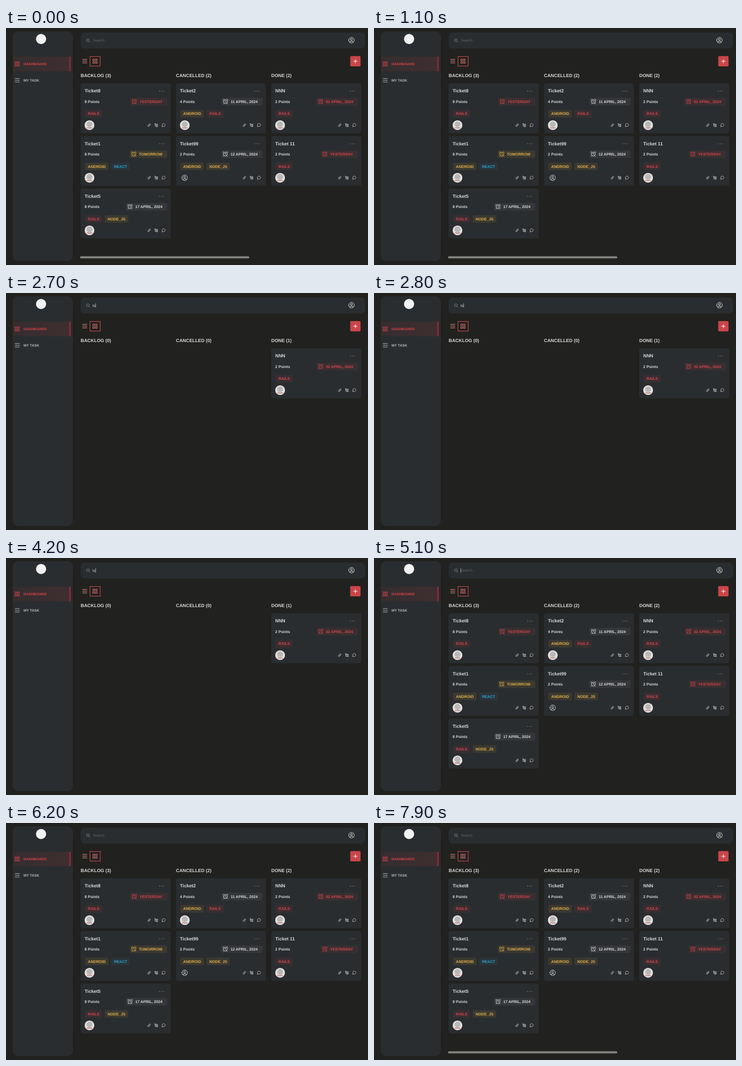
Recreate the animation shown at these times as an HTML page with a canvas. Size 640 by 420 pixels, loop 8 s.

```html
<!DOCTYPE html>
<html lang="en">
<head>
<meta charset="utf-8">
<title>Ticket board</title>
<style>
  html, body { margin: 0; width: 100%; height: 100%; overflow: hidden; background: #21221f; }
  canvas { display: block; width: 640px; height: 420px; }
</style>
</head>
<body>
<canvas id="stage"></canvas>
<script>
const LOOP = 8000;
const FONT = '"Liberation Sans", Arial, sans-serif';
const C = {
  bg: '#21221f', panel: '#2a2d2f', light: '#d6d7d7', dim: '#64676a',
  red: '#d4434a', yellow: '#e0b048', blue: '#2e9fd0', button: '#cb4549'
};
const TINT = {
  [C.red]: 'rgba(212,67,74,.09)', [C.yellow]: 'rgba(224,176,72,.09)',
  [C.blue]: 'rgba(46,159,208,.07)', [C.light]: 'rgba(148,151,154,.1)'
};
const TAG_COLOR = { RAILS: C.red, ANDROID: C.yellow, REACT: C.blue, NODE_JS: C.yellow };

const card = (title, points, due, color, tags, avatar = true) =>
  ({ title, points, due, color, tags, avatar });
const COLUMNS = [
  { name: 'BACKLOG', cards: [
    card('Ticket8', 8, 'YESTERDAY', C.red, ['RAILS']),
    card('Ticket1', 8, 'TOMORROW', C.yellow, ['ANDROID', 'REACT']),
    card('Ticket5', 8, '17 APRIL, 2024', C.light, ['RAILS', 'NODE_JS'])
  ] },
  { name: 'CANCELLED', cards: [
    card('Ticket2', 4, '11 APRIL, 2024', C.light, ['ANDROID', 'RAILS']),
    card('Ticket99', 2, '12 APRIL, 2024', C.light, ['ANDROID', 'NODE_JS'], false)
  ] },
  { name: 'DONE', cards: [
    card('NNN', 2, '02 APRIL, 2024', C.red, ['RAILS']),
    card('Ticket 11', 2, 'YESTERDAY', C.red, ['RAILS'])
  ] }
];

// Moments of the interaction, in ms
const FOCUS = 1900, TYPE = 2700, CLEAR = 4800, BLUR = 5800;
const BAR_OFF = 1400, BAR_ON = 6600;

const canvas = document.getElementById('stage');
const ctx = canvas.getContext('2d');
const ratio = window.devicePixelRatio || 1;
canvas.width = 640 * ratio;
canvas.height = 420 * ratio;
// Unhinted glyphs keep their true height at these small sizes
ctx.textRendering = 'geometricPrecision';

function setFont(size, weight = 'bold') {
  ctx.font = `${weight} ${size}px ${FONT}`;
}

function text(str, x, y, size, color, weight) {
  setFont(size, weight);
  ctx.fillStyle = color;
  ctx.fillText(str, x, y);
}

function box(x, y, w, h, r, fill) {
  ctx.beginPath();
  ctx.roundRect(x, y, w, h, r);
  ctx.fillStyle = fill;
  ctx.fill();
}

function disc(x, y, r, fill) {
  ctx.beginPath();
  ctx.arc(x, y, r, 0, Math.PI * 2);
  ctx.fillStyle = fill;
  ctx.fill();
}

// Strokes an SVG path centred on (x, y)
function icon(d, x, y, color, width = 0.9) {
  ctx.save();
  ctx.translate(x, y);
  ctx.strokeStyle = color;
  ctx.lineWidth = width;
  ctx.lineCap = ctx.lineJoin = 'round';
  ctx.stroke(new Path2D(d));
  ctx.restore();
}

const ring = (r, x = 0, y = 0) => `M${x - r} ${y}a${r} ${r} 0 1 1 ${2 * r} 0a${r} ${r} 0 1 1 ${-2 * r} 0`;
const ICON = {
  grid: 'M-3.7-3.7h2.7v2.7h-2.7zM1-3.7h2.7v2.7h-2.7zM-3.7 1h2.7v2.7h-2.7zM1 1h2.7v2.7h-2.7z',
  list: 'M-3.8-3.1h7.6M-3.8 0h7.6M-3.8 3.1h7.6',
  search: ring(2.4, -0.4, -0.4) + 'M1.4 1.4L3 3',
  user: ring(4.9) + ring(1.7, 0, -1.1) + 'M-2.9 3.6q0-2 2.9-2t2.9 2',
  clock: ring(3.5, 0, 0.4) + 'M0-1.6v2.2l1.5.7M-4.4-2.5l1.8-1.6M4.4-2.5l-1.8-1.6M-2.5 3.2l-1 1M2.5 3.2l1 1',
  clip: 'M2-.5L-.4 2a1.2 1.2 0 0 1-1.7-1.7L.6-2.3a.8.8 0 0 1 1.2 1.2L-.8 1.3',
  branch: 'M-2-2.6v4.4h2M-2-1h2M.5-1.8h2v1.6h-2zM.5 1h2v1.6h-2zM-2.8-2.6h1.6',
  bubble: 'M-2.3 2.7l.4-1.5a2.7 2.7 0 1 1 1.2 1.2z',
  plus: 'M-3 0h6M0-3v6'
};

function drawSidebar() {
  box(12, 6, 106, 407, 9, C.panel);
  disc(62, 19.5, 9, '#f2f2f2');
  const glow = ctx.createLinearGradient(12, 0, 114, 0);
  glow.addColorStop(0, 'rgba(190,50,55,.08)');
  glow.addColorStop(1, 'rgba(190,50,55,.14)');
  box(12, 51, 102, 25.5, 0, glow);
  box(112.4, 51, 1.6, 25.5, 0, '#c3262d');
  icon(ICON.grid, 20, 63.7, C.red);
  text('DASHBOARD', 31, 66, 6.3, C.red);
  icon(ICON.list, 20, 92.7, '#b5b6b6');
  text('MY TASK', 31, 95, 6.3, '#b5b6b6');
}

function drawHeader(query, caret) {
  box(132, 8, 503, 28.5, 8, C.panel);
  icon(ICON.search, 145.3, 22, '#8a8c8e', 0.8);
  if (query) text(query, 153, 24.5, 6.5, C.light, 'normal');
  else text('Search', 154, 24.3, 6.3, C.dim, 'normal');
  if (caret) box(query ? 158 : 153, 18.3, 0.7, 7.4, 0, '#c8c9ca');
  icon(ICON.user, 610.8, 21.6, '#dddddd');
}

function drawToolbar() {
  icon(ICON.list, 139.2, 58.8, '#d08a88', 1);
  ctx.strokeStyle = '#c4484c';
  ctx.lineWidth = 1;
  ctx.strokeRect(148.5, 50.5, 18, 17);
  icon(ICON.grid, 157.5, 58.8, '#dc7474');
  box(608.6, 49.8, 18.2, 18.2, 1.8, C.button);
  icon(ICON.plus, 617.7, 58.9, '#f3e4e4', 1.1);
}

function drawAvatar(x, y) {
  disc(x, y, 8.6, '#e2e1e0');
  disc(x, y - 1.6, 5.2, '#b9b8b7');
  box(x - 5, y + 4, 10, 1.8, 0.9, '#c58a88');
}

function drawCard(c, x, y) {
  box(x, y, 159, 88.5, 4, C.panel);
  text(c.title, x + 7, y + 16.4, 8.2, C.light);
  for (let i = 0; i < 3; i++) disc(x + 139.6 + i * 3.7, y + 13.9, 0.65, '#9a9c9e');

  text(`${c.points} Points`, x + 7, y + 34.6, 6.75, C.light);
  setFont(6.75);
  const dueX = x + 144.6 - ctx.measureText(c.due).width;
  box(dueX - 16.5, y + 25.8, x + 153 - dueX + 16.5, 13.4, 2, TINT[c.color]);
  icon(ICON.clock, dueX - 9.2, y + 32, c.color);
  text(c.due, dueX, y + 34.6, 6.75, c.color);

  let tagX = x + 12.8;
  for (const tag of c.tags) {
    setFont(6.75);
    const w = ctx.measureText(tag).width;
    box(tagX - 5, y + 47.3, w + 10, 13.4, 2, TINT[TAG_COLOR[tag]]);
    text(tag, tagX, y + 56.4, 6.75, TAG_COLOR[tag]);
    tagX += w + 14.6;
  }

  if (c.avatar) drawAvatar(x + 15.6, y + 74.2);
  else icon(ICON.user, x + 15.4, y + 74.2, '#cfd0d0');
  icon(ICON.clip, x + 121, y + 74.2, '#c4c5c6', 0.8);
  icon(ICON.branch, x + 133.6, y + 74.2, '#c4c5c6', 0.8);
  icon(ICON.bubble, x + 146.2, y + 74, '#c4c5c6', 0.8);
}

function drawBoard(query) {
  COLUMNS.forEach(({ name, cards }, col) => {
    const x = 132 + col * 168.5;
    const shown = cards.filter(c => c.title.startsWith(query));
    text(`${name} (${shown.length})`, x, 86.8, 8.2, C.light);
    shown.forEach((c, row) => drawCard(c, x, 98 + row * 93.2));
  });
}

function caretVisible(t) {
  if (t < FOCUS || t >= BLUR) return false;
  const start = t >= CLEAR ? CLEAR : t >= TYPE ? TYPE + 50 : FOCUS;
  return t < start || (t - start) % 1000 < 500;
}

function draw(t) {
  const query = t >= TYPE && t < CLEAR ? 'N' : '';
  ctx.setTransform(ratio, 0, 0, ratio, 0, 0);
  ctx.fillStyle = C.bg;
  ctx.fillRect(0, 0, 640, 420);
  drawSidebar();
  drawHeader(query, caretVisible(t));
  drawToolbar();
  drawBoard(query);
  if (t < BAR_OFF || t >= BAR_ON) box(131, 404.6, 299, 3.6, 1.5, '#82837f');
}

const began = performance.now();
function frame() {
  draw((performance.now() - began) % LOOP);
  requestAnimationFrame(frame);
}
frame();
</script>
</body>
</html>
```
